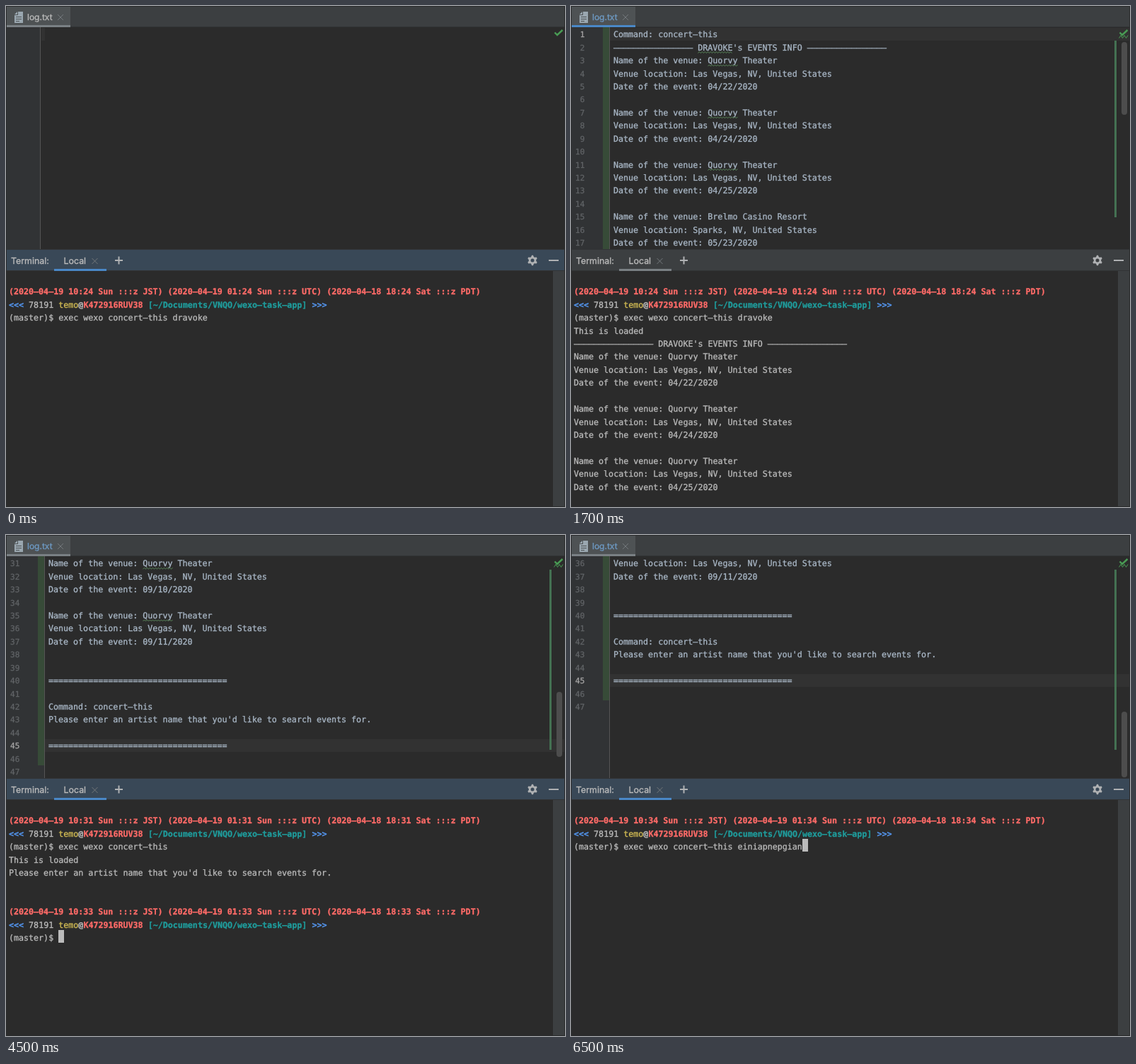
An HTML page with a canvas for the animation above (8 s loop, 790x709 px).

```html
<!DOCTYPE html>
<html lang="en">
<head>
<meta charset="utf-8">
<title>Editor and terminal</title>
<style>
html, body { margin: 0; width: 100%; height: 100%; overflow: hidden; background: #2b2b2b; }
canvas { display: block; }
</style>
</head>
<body>
<canvas id="stage" width="790" height="709"></canvas>
<script>
const ctx = document.getElementById('stage').getContext('2d');
const W = 790, H = 709, LOOP = 8000;
const ROW = 18.43, CHAR = 7.025, LEFT = 4;
const MONO = '"DejaVu Sans Mono", monospace';
const UI = 'Inter, sans-serif';
const C = {
  bg: '#2b2b2b', bar: '#3c3f41', gutter: '#313335', caret: '#323232', edge: '#292b2c',
  text: '#bbbbbb', code: '#a9b7c6', red: '#ff6b68', blue: '#5394ec',
  yellow: '#d6bf55', cyan: '#1f9c9c', green: '#447152', added: '#374b38',
  accent: '#4a88c7', idle: '#7a8084', tab: '#4e5254', focus: '#394857'
};
const ARTIST = 'DRAVOKE', HALL = 'Quorvy';
const RULE = '='.repeat(36);
const ASK = "Please enter an artist name that you'd like to search events for.";
const TITLE = `${'-'.repeat(16)} ${ARTIST}'s EVENTS INFO ${'-'.repeat(16)}`;
const VEGAS = 'Las Vegas, NV', THEATER = HALL + ' Theater';

const event = (date, venue = THEATER, city = VEGAS) => [
  'Name of the venue: ' + venue,
  `Venue location: ${city}, United States`,
  `Date of the event: ${date}/2020`, ''
];
const spring = ['04/22', '04/24', '04/25'].flatMap(d => event(d));
const first = ['Command: concert-this', TITLE, ...spring,
  ...event('05/23', 'Brelmo Casino Resort', 'Sparks, NV').slice(0, 3)];
const tail = [...event('09/10'), ...event('09/11'), '', RULE, ''];
const asked = [...tail, 'Command: concert-this', ASK, '', RULE, '', ''];

const prompt = (min, cmd) => ({ min, cmd });
const scenes = [
  { at: 0, lines: null, term: [prompt(24, 'exec wexo concert-this dravoke')] },
  { at: 500, top: 1, lines: first, caret: 1, added: 17, stripe: 299, thumb: [51, 154], editing: true,
    term: [prompt(24, 'exec wexo concert-this dravoke'), 'This is loaded', TITLE, ...spring] },
  { at: 2500, top: 31, lines: [...tail, ''], caret: 42, added: 11, stripe: 299, thumb: [239, 343],
    term: [prompt(31, 'exec wexo concert-this')] },
  { at: 4500, top: 31, lines: asked, caret: 45, added: 16, stripe: 304, thumb: [222, 314],
    term: [prompt(31, 'exec wexo concert-this'), 'This is loaded', ASK, '', '', prompt(33, '')],
    cursor: [10, 9] },
  { at: 6500, top: 36, lines: asked.slice(5), caret: 45, added: 11, stripe: 304, thumb: [250, 343],
    term: [prompt(34, 'exec wexo concert-this einiapnepgian')], cursor: [46, 2] }
];

function rect(x, y, w, h, color) {
  ctx.fillStyle = color;
  ctx.fillRect(x, y, w, h);
}

function line(points, color, width = 1) {
  ctx.beginPath();
  points.forEach(([x, y]) => ctx.lineTo(x, y));
  ctx.strokeStyle = color;
  ctx.lineWidth = width;
  ctx.stroke();
}

// A hairline outline gives the text a slightly heavier weight.
function text(str, x, y, color, font) {
  ctx.font = font;
  ctx.fillStyle = ctx.strokeStyle = color;
  ctx.lineWidth = 0.3;
  ctx.fillText(str, x, y);
  ctx.strokeText(str, x, y);
}

// Hyphens are drawn as wide dashes, as the terminal face has them.
function mono(str, x, y, color, bold) {
  text(str.replace(/-/g, '–'), x, y, color, `${bold ? 'bold ' : ''}11.67px ${MONO}`);
  return x + str.length * CHAR;
}

function cross(x, y) {
  line([[x - 4, y - 4], [x + 4, y + 4]], '#73787b');
  line([[x - 4, y + 4], [x + 4, y - 4]], '#73787b');
}

function zigzag(x, end, y, color, amp = 1, step = 2) {
  const points = [];
  for (let i = 0; x + i * step <= end; i++) points.push([x + i * step, y + (i % 2 ? -amp : amp)]);
  line(points, color);
}

function fileIcon() {
  ctx.fillStyle = '#9aa7b0';
  ctx.beginPath();
  [[17, 8], [24, 8], [24, 24], [12, 24], [12, 13], [17, 13]].forEach(p => ctx.lineTo(...p));
  ctx.fill();
  ctx.beginPath();
  [[12, 12], [16, 12], [16, 8]].forEach(p => ctx.lineTo(...p));
  ctx.fill();
  [[14, 15, 8], [14, 18, 8], [14, 21, 5]].forEach(([x, y, w]) => rect(x, y, w, 1, C.tab));
}

function gear(x, y) {
  ctx.fillStyle = '#afb1b3';
  ctx.beginPath();
  for (let i = 0; i < 24; i++) {
    const a = (i - 0.5) * Math.PI / 12, r = i % 4 < 2 ? 7.2 : 5.2;
    ctx.lineTo(x + r * Math.sin(a), y + r * Math.cos(a));
  }
  ctx.closePath();
  ctx.moveTo(x + 2.5, y);
  ctx.arc(x, y, 2.5, 0, 7);
  ctx.fill('evenodd');
}

function editor(s) {
  rect(0, 0, W, 30, C.bar);
  rect(1, 1, 90, 27, C.tab);
  rect(1, 27, 90, 3, s.editing ? C.accent : C.idle);
  rect(91, 29, W, 1, '#323436');
  fileIcon();
  text('log.txt', 30, 20, s.lines ? '#6e9bc5' : C.text, '12px ' + UI);
  cross(77, 16);
  rect(0, 30, W, 315, C.bg);

  if (!s.lines) {
    rect(0, 30, 48, 315, C.gutter);
    rect(48, 30, 1, 315, '#555555');
    rect(50, 31, 5, 18, C.caret);
  } else {
    const caretY = 31 + (s.caret - s.top) * ROW;
    rect(0, 30, 55, 315, C.gutter);
    rect(55, Math.round(caretY), 734, 18, C.caret);
    rect(45, 30, 10, Math.min(345, Math.round(31 + s.added * ROW)) - 30, C.added);
    rect(54, 30, 1, 315, '#555555');
    s.lines.forEach((str, i) => {
      const n = s.top + i, y = 44.3 + i * ROW;
      ctx.textAlign = 'right';
      text(n, 19.3, y, n === s.caret ? '#a4a3a3' : '#606366', '11px ' + MONO);
      ctx.textAlign = 'left';
      mono(str, 60, y, C.code);
      [ARTIST, HALL].forEach(word => {
        const k = str.indexOf(word);
        if (k < 0) return;
        const x = 60 + k * CHAR;
        zigzag(x, x + word.length * CHAR, y + 3, '#5b8a5c');
      });
    });
    rect(768, 49, 3, s.stripe - 49, C.green);
    ctx.fillStyle = '#4d4d4d';
    ctx.beginPath();
    ctx.roundRect(778, s.thumb[0], 8, s.thumb[1] - s.thumb[0], 4);
    ctx.fill();
    zigzag(774.5, 788, 43.5, '#499c54', 2, 2.5);
  }
  line([[775.5, 37.5], [779, 41], [786.5, 34]], '#499c54', 2.4);
}

function terminalBar(s) {
  rect(0, 345, W, 30, s.editing ? C.bar : C.focus);
  rect(0, 344, W, 1, '#323436');
  rect(0, 374, W, 1, '#323436');
  rect(68, 372, 74, 3, s.editing ? C.idle : C.accent);
  text('Terminal:', 7, 365, C.text, '12.4px ' + UI);
  text('Local', 81.5, 365, C.text, '12.4px ' + UI);
  cross(125.5, 361);
  rect(154, 359, 11, 2, '#afb1b3');
  rect(158.5, 354.5, 2, 11, '#afb1b3');
  gear(744, 360);
  rect(767, 359, 14, 2, '#afb1b3');
}

function drawPrompt({ min, cmd }, y) {
  mono(`(2020-04-19 10:${min} Sun :::z JST) (2020-04-19 01:${min} Sun :::z UTC) ` +
    `(2020-04-18 18:${min} Sat :::z PDT)`, LEFT, y, C.red, true);
  let x = LEFT;
  [['<<< ', C.blue, 1], ['78191 ', C.text], ['temo', C.yellow], ['@', C.text, 1],
    ['K472916RUV38 ', C.red, 1], ['[~/Documents/VNQO/wexo-task-app] ', C.cyan, 1], ['>>>', C.blue, 1]
  ].forEach(([str, color, bold]) => { x = mono(str, x, y + ROW, color, bold); });
  mono('(master)$ ' + cmd, LEFT, y + 2 * ROW, C.text);
}

function terminal(s) {
  rect(0, 375, W, 334, C.bg);
  rect(773, 375, 17, 334, C.bar);
  let y = 408.3;
  s.term.forEach(item => {
    if (typeof item === 'string') {
      mono(item, LEFT, y, C.text);
      y += ROW;
    } else {
      drawPrompt(item, y);
      y += 3 * ROW;
    }
  });
  if (s.cursor) {
    const [col, row] = s.cursor;
    rect(Math.round(LEFT + col * CHAR), Math.floor(394 + row * ROW), 8, 18, C.text);
  }
}

function draw(t) {
  const s = scenes.filter(scene => scene.at <= t).pop();
  editor(s);
  terminalBar(s);
  terminal(s);
  ctx.strokeStyle = C.edge;
  ctx.lineWidth = 1;
  ctx.strokeRect(0.5, 0.5, W - 1, H - 1);
}

ctx.textRendering = 'geometricPrecision';
const start = performance.now();
function tick() {
  draw((performance.now() - start) % LOOP);
  requestAnimationFrame(tick);
}
tick();
</script>
</body>
</html>
```
